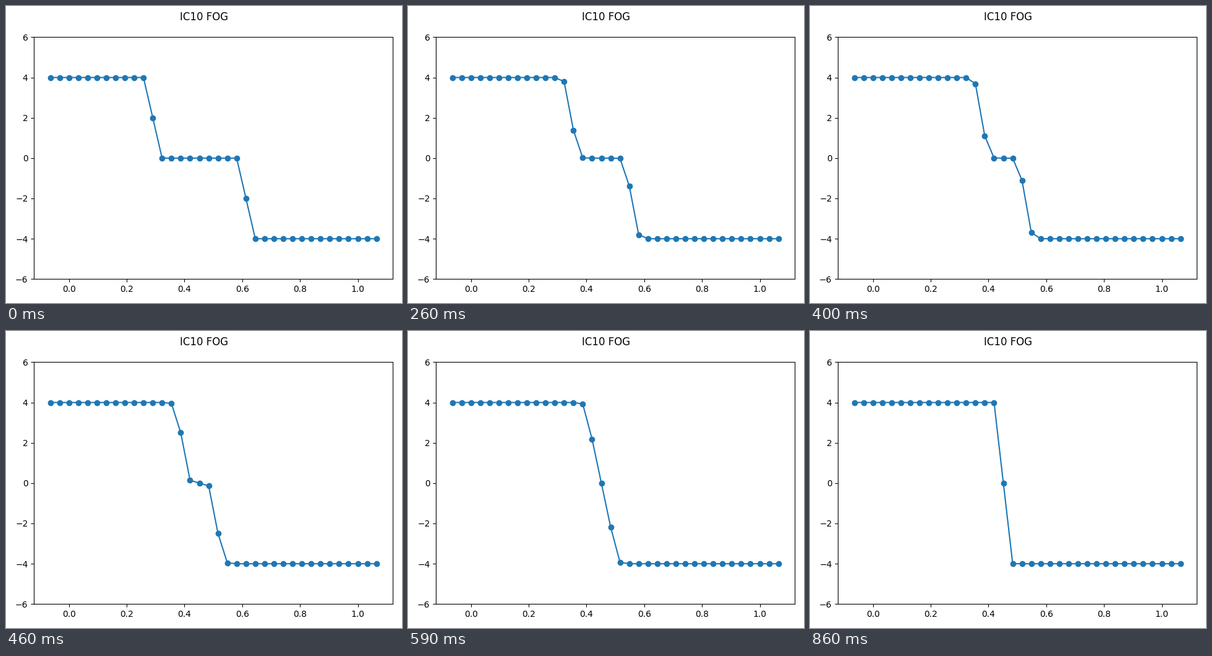
Write a matplotlib script that moves like this. It is 640x480 px and loops after 8000 ms.

```python
import numpy as np
import matplotlib.pyplot as plt
from matplotlib.animation import FuncAnimation

W, H, DPI = 640, 480, 100
INTERVAL = 20       # ms per drawn frame
FRAMES = 400
STEP_MS = 66.2      # time between solver steps
LEAD_MS = 16        # centres the frame grid on the step times
STEPS = 13
CELLS = 31
LAM = 0.9 / 4       # dt/dx at CFL 0.9 with max speed 4


def godunov_flux(left, right):
    """Exact Riemann flux of the inviscid Burgers equation."""
    return np.maximum(np.maximum(left, 0) ** 2, np.minimum(right, 0) ** 2) / 2


def advance(u):
    flux = godunov_flux(u[:-1], u[1:])
    new = u.copy()
    new[1:-1] -= LAM * np.diff(flux)
    return new


cell = np.arange(-2, CELLS + 3)
x = cell / CELLS
u0 = -2.0 * (np.sign(cell - 9) + np.sign(cell - 19))

states = [u0]
for _ in range(STEPS):
    states.append(advance(states[-1]))

fig, ax = plt.subplots(figsize=(W / DPI, H / DPI), dpi=DPI)
fig.suptitle("IC10 FOG", y=1 - 8.6 / H)
line, = ax.plot(x, u0, "o-")
ax.set_ylim(-6, 6)
fig.tight_layout()
fig.subplots_adjust(left=45.2 / W, right=625 / W, top=1 - 50.4 / H)


def draw(frame):
    step = int((frame * INTERVAL + LEAD_MS) / STEP_MS)
    line.set_ydata(states[min(step, STEPS)])
    return line,


anim = FuncAnimation(fig, draw, frames=FRAMES, interval=INTERVAL,
                     repeat=True, repeat_delay=0)
plt.show()
```
